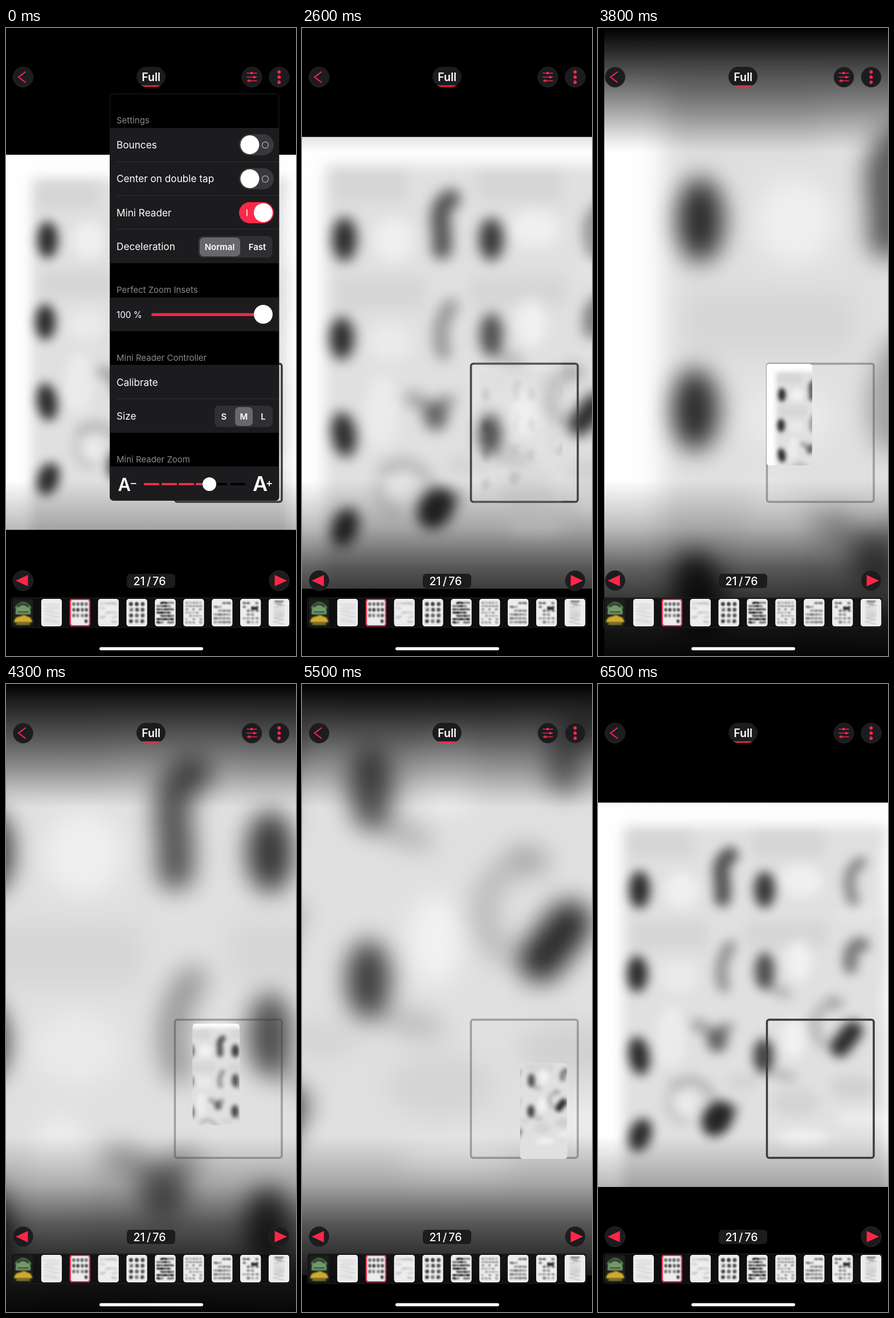
These frames come from a looping animation (509 px wide and 1100 px high, 6600 ms). An HTML page:

```html
<!DOCTYPE html>
<html lang="en">
<head>
<meta charset="utf-8">
<title>Mini Reader</title>
<style>
  html, body { margin: 0; width: 100%; height: 100%; overflow: hidden; background: #000; }
  svg { display: block; width: 509px; height: 1100px; }
  text { font-family: Inter, "Open Sans", sans-serif; fill: #fff; }
  .label { font-size: 17.2px; }
  .head { font-size: 15px; fill: #8a8a8f; }
  .seg { font-size: 15px; font-weight: 600; text-anchor: middle; }
  .red { fill: #fc2848; }
  .line { fill: none; stroke: #fc2848; }
</style>
</head>
<body>
<svg id="stage" viewBox="0 0 509 1100">
  <defs>
    <filter id="soft" filterUnits="userSpaceOnUse" x="-40" y="-40" width="590" height="740" color-interpolation-filters="sRGB">
      <feGaussianBlur stdDeviation="9.5"/>
    </filter>
    <filter id="fine" color-interpolation-filters="sRGB"><feGaussianBlur stdDeviation="1"/></filter>
    <linearGradient id="topShade" x2="0" y2="1">
      <stop offset="0" stop-opacity="1"/><stop offset=".18" stop-opacity=".84"/>
      <stop offset=".46" stop-opacity=".57"/><stop offset=".7" stop-opacity=".32"/>
      <stop offset=".9" stop-opacity=".09"/><stop offset="1" stop-opacity="0"/>
    </linearGradient>
    <linearGradient id="lowShade" x2="0" y2="1">
      <stop offset="0" stop-opacity="0"/><stop offset=".27" stop-opacity=".26"/>
      <stop offset=".5" stop-opacity=".62"/><stop offset=".8" stop-opacity=".9"/>
      <stop offset="1" stop-opacity=".97"/>
    </linearGradient>
    <clipPath id="pageClip"><rect width="509" height="657"/></clipPath>
    <clipPath id="frameClip"><rect x="295" y="586.5" width="190" height="245"/></clipPath>
    <clipPath id="viewClip"><rect id="view" rx="5"/></clipPath>
    <clipPath id="pillClip"><rect x="229" y="68" width="51" height="35" rx="17.5"/></clipPath>
    <clipPath id="thumbClip"><rect width="36" height="48" rx="4"/></clipPath>
    <g id="page" clip-path="url(#pageClip)"></g>
  </defs>
  <rect width="509" height="1100"/>
  <use id="main" href="#page"/>
  <rect width="509" height="217" fill="url(#topShade)"/>
  <rect y="792" width="509" height="308" fill="url(#lowShade)"/>
  <rect id="frame" x="296.5" y="588" width="187.5" height="242" rx="4" fill="none" stroke="#3a3a3c" stroke-width="3.5"/>
  <g id="mini" clip-path="url(#frameClip)"><g clip-path="url(#viewClip)">
    <use href="#page" transform="translate(295.5 587) scale(.373)"/>
  </g></g>
  <g id="bars"></g>
  <g id="menu"></g>
</svg>
<script>
const $ = id => document.getElementById(id);
const rect = (x, y, w, h, r, fill, more = '') =>
  `<rect x="${x}" y="${y}" width="${w}" height="${h}" rx="${r}" fill="${fill}" ${more}/>`;
const circle = (x, y, r, fill, more = '') => `<circle cx="${x}" cy="${y}" r="${r}" fill="${fill}" ${more}/>`;
const blob = (x, y, rx, ry, turn, a, fill = '#1c1c1e') =>
  `<ellipse rx="${rx}" ry="${ry}" fill="${fill}" opacity="${a}" transform="translate(${x} ${y}) rotate(${turn})"/>`;
const stroke = (d, w, a) =>
  `<path d="${d}" fill="none" stroke="#1c1c1e" stroke-width="${w}" stroke-linecap="round" opacity="${a}"/>`;
const text = (cls, x, y, s, more = '') => `<text class="${cls}" x="${x}" y="${y}" ${more}>${s}</text>`;
const RED = '#fc2848', PANEL = '#1c1c1f';

function drawPage() {
  const light = (x, y, rx, ry, a) => blob(x, y, rx, ry, 0, a, '#fff');
  const marks = [
    rect(44, 262, 452, 650, 12, '#e0e0e0'),
    rect(52, 266, 112, 50, 8, '#d6d6d6'), rect(265, 266, 125, 50, 8, '#d6d6d6'),
    rect(60, 425, 130, 48, 8, '#d6d6d6'), rect(255, 425, 140, 44, 8, '#d6d6d6'),
    light(145, 372, 30, 32, .5), light(350, 356, 38, 28, .5), light(345, 492, 22, 36, .55),
    light(140, 520, 34, 28, .3), light(128, 625, 22, 55, .5), light(336, 625, 20, 34, .6),
    light(152, 738, 16, 18, .4), light(352, 795, 44, 14, .55), light(455, 762, 48, 14, .4),
    light(505, 350, 22, 80, .5), light(500, 560, 14, 60, .3), light(450, 410, 40, 14, .2),
    blob(73, 371, 18, 32, 0, .92), blob(69, 515, 18, 31, 0, .92),
    blob(72, 655, 18, 33, -9, .92), blob(74, 790, 19, 29, 18, .92),
    stroke('M228 312Q210 322 213 345T215 386', 28, .72),
    stroke('M228 468Q205 498 217 536', 22, .38),
    blob(206, 628, 18, 21, 0, .62), blob(180, 606, 22, 12, 25, .3), blob(222, 606, 14, 10, 0, .35),
    blob(206, 762, 25, 32, 30, .95), blob(231, 748, 12, 12, 0, .4),
    stroke('M122 725Q122 762 150 768', 14, .13), stroke('M130 708Q170 680 196 722', 18, .2),
    blob(287, 371, 18, 31, 0, .86), blob(287, 510, 17, 32, 0, .74), blob(312, 544, 24, 9, 20, .25),
    blob(285, 655, 17, 30, 0, .82), blob(318, 688, 26, 9, 12, .2),
    stroke('M452 324Q420 342 439 390', 20, .45),
    stroke('M454 465Q430 464 434 502', 25, .52),
    stroke('M414 566Q392 562 378 584T386 634', 19, .2), blob(405, 562, 14, 10, 20, .16),
    stroke('M438 612L416 640', 34, .92),
    blob(438, 708, 40, 20, 0, .08), blob(340, 735, 42, 24, 0, .06),
    blob(250, 700, 30, 14, 0, .06), blob(130, 640, 8, 60, 0, .03)
  ];
  return '<rect width="509" height="657" fill="#fefefe"/>' +
    `<g filter="url(#soft)"><g transform="translate(0 -222)">${marks.join('')}</g></g>`;
}

function drawThumbs() {
  let seed = 7;
  const rnd = () => (seed = seed * 16807 % 2147483647) / 2147483647;
  // columns, rows, chance of a mark, darkest opacity, mark size
  const looks = [0, [1, 12, .9, .12, 15], [4, 4, .85, .9, 2.8], [3, 5, .8, .16, 6], [3, 4, 1, .9, 3.4],
    [5, 7, .85, 1, 3.7], [5, 7, .8, .4, 2.8], [4, 6, .8, .55, 4], [4, 6, .7, .55, 3.2], [1, 11, 1, .2, 11]];
  return looks.map((look, i) => {
    let art = '';
    if (!look) {
      art = rect(0, 0, 36, 48, 4, '#182018') +
        '<path d="M4 14Q18-3 32 14L30 20H6Z" fill="#6f9968"/><path d="M8 14Q18 4 28 14" stroke="#1c241c" stroke-width="3" fill="none"/>' +
        rect(5, 20, 26, 7, 1, '#7fa579') + rect(8, 22, 20, 2, 0, '#243024') +
        '<path d="M2 41Q4 30 12 31Q20 26 26 31Q33 31 34 41Z" fill="#d0a92c"/>' + rect(6, 42, 24, 3.5, 0, '#8b7c32');
    } else {
      const [cols, rows, chance, dark, size] = look;
      art = rect(0, 0, 36, 48, 4, '#ededed');
      for (let r = 0; r < rows; r++) for (let c = 0; c < cols; c++) {
        const x = 18 + (c - (cols - 1) / 2) * 30 / cols, y = 4 + (r + .5) * 40 / rows;
        const a = dark * (.45 + .55 * rnd());
        if (rnd() < chance) art += blob(x + rnd() - .5, y, size, Math.min(14 / rows, size * 1.2), rnd() * 20 - 10, a);
      }
      if (i === 8) art += rect(19, 14, 12, 5, 1, '#333');
      if (i === 9) art += rect(10, 3, 16, 3, 1, '#777') + rect(13, 8, 10, 2, 1, '#888');
    }
    const edge = i === 2 ? rect(1, 1, 34, 46, 4, 'none', `stroke="${RED}" stroke-width="2.2"`)
      : i ? rect(.7, .7, 34.6, 46.6, 4, 'none', 'stroke="#fff" stroke-width="1.4"') : '';
    return `<g transform="translate(${12 + i * 49.9} 1000)"><g clip-path="url(#thumbClip)"><g filter="url(#fine)">${art}</g></g>${edge}</g>`;
  }).join('');
}

function drawBars() {
  const button = (x, y) => circle(x, y, 17.5, PANEL, 'stroke="#2b2b2e"');
  const knob = (x, y) => `<path class="line" d="M422.5 ${y}H440.5" stroke-width="1.4"/>` + circle(x, y, 2.3, RED);
  return button(30, 86) + '<path class="line" d="M34.5 76.5L22 86L34.5 95.5" stroke-width="2"/>' +
    rect(229, 68, 51, 35, 17.5, PANEL) +
    `<g clip-path="url(#pillClip)">${rect(238, 100.5, 33, 3, 0, RED)}</g>` +
    text('', 254.7, 93, 'Full', 'font-size="19.5" font-weight="600" text-anchor="middle"') +
    button(431.5, 86) + knob(431, 79) + knob(436, 86) + knob(427, 92.5) +
    button(479.5, 86) + [77, 86, 95].map(y => circle(479.3, y, 2.9, RED)).join('') +
    button(30, 968) + '<path class="red" d="M17 968L38.5 958V978Z"/>' +
    button(479.5, 968) + '<path class="red" d="M493 968L471.500 958V978Z"/>' +
    rect(212, 956, 85, 25, 6, PANEL) +
    text('', 252, 976, '21 / 76', 'font-size="19.5" font-weight="500" text-anchor="middle" word-spacing="-2"') +
    rect(9.5, 998, 489.5, 52, 4, '#111113', 'fill-opacity=".88" stroke="#252528"') + drawThumbs() +
    rect(164, 1084.5, 182, 5.5, 2.75, '#fff');
}

function drawMenu() {
  const section = (y, h) => rect(183, y, 296, h, 0, PANEL);
  const rule = y => `<path d="M194 ${y}H479" stroke="#303034"/>`;
  const toggle = (y, on) => rect(409, y - 18.5, 61, 37, 18.5, on ? RED : '#39393d') +
    circle(on ? 451.5 : 428, y, 16.5, '#fff') +
    (on ? rect(422, y - 6, 1.6, 12, 0, '#fff') : circle(455, y + .5, 5.5, 'none', 'stroke="#a0a0a4" stroke-width="1.4"'));
  const dash = (x, end, fill) => rect(x, 797, end - x, 4, 1, fill);
  return rect(182.5, 115.5, 296.5, 712, 6, '#000', 'stroke="#1e1e20"') +
    section(175, 237) + section(472, 59) + section(590, 119) +
    '<path d="M183 768H479V821Q479 827 473 827H189Q183 827 183 821Z" fill="#1c1c1f"/>' +
    [234.5, 293.5, 352.5, 649.5].map(rule).join('') +
    [[167, 'Settings'], [464, 'Perfect Zoom Insets'], [583, 'Mini Reader Controller'], [761, 'Mini Reader Zoom']]
      .map(([y, s]) => text('head', 194, y, s)).join('') +
    [[211, 'Bounces'], [270, 'Center on double tap'], [329.5, 'Mini Reader'], [389, 'Deceleration'],
      [626.5, 'Calibrate'], [686, 'Size']].map(([y, s]) => text('label', 194, y, s)).join('') +
    toggle(204.5) + toggle(264) + toggle(323.5, true) +
    rect(337.5, 364.5, 130, 37.5, 8, '#303034') + rect(340, 367, 71, 33, 7, '#67676c') +
    text('seg', 375, 389, 'Normal') + text('seg', 441, 389, 'Fast') +
    rect(366, 661.5, 102, 37.5, 8, '#303034') + rect(402, 664, 31, 33, 7, '#67676c') +
    text('seg', 382.5, 686, 'S') + text('seg', 417.5, 686, 'M') + text('seg', 451.5, 686, 'L') +
    text('', 194, 507.5, '100 %', 'font-size="15.3"') +
    rect(255, 499.5, 190, 5, 2.5, RED) + circle(451.5, 501.5, 16.5, '#fff') +
    text('', 196.5, 811, 'A', 'font-size="31" font-weight="600"') + rect(219, 797, 9.5, 1.8, 0, '#fff') +
    text('', 433, 811, 'A', 'font-size="36" font-weight="600"') +
    '<path d="M457.500 798H466.500M462 793.500V802.500" stroke="#fff" stroke-width="1.8"/>' +
    [242, 273, 303, 333].map(x => dash(x, x + 27, RED)).join('') +
    dash(368, 388, '#000') + dash(393, 420, '#000') + circle(357, 799, 12, '#fff');
}

const LOOP = 6600, STEP = 100, MENU_END = 1400, ZOOM = 2.31;
// time, x, y of the zoomed page
const path = [[2500, -60, 20], [3200, -520, 31], [3800, 11, -8], [4700, -429, -122],
  [5500, -542, -482], [6000, -100, -525], [6600, -100, -530]];
const mix = (a, b, p) => a + (b - a) * p;
const smooth = (t, from, to) => {
  const p = Math.min(1, Math.max(0, (t - from) / (to - from)));
  return p * p * (3 - 2 * p);
};

function along(t, k) {
  const last = path.length - 1;
  let i = 0;
  while (i < last - 1 && t >= path[i + 1][0]) i++;
  const slope = j => {
    if (j === 0 || j === last) return 0;
    const a = path[j - 1], b = path[j + 1];
    return (b[k] - a[k]) / (b[0] - a[0]);
  };
  const a = path[i], b = path[i + 1], h = b[0] - a[0];
  const p = Math.min(1, Math.max(0, (t - a[0]) / h)), q = 1 - p;
  return a[k] * q * q * (1 + 2 * p) + b[k] * p * p * (1 + 2 * q) +
    h * p * q * (slope(i) * q - slope(i + 1) * p);
}

function setBox(el, x, y, w, h) {
  Object.entries({ x, y, width: w, height: h }).forEach(([k, v]) => el.setAttribute(k, v));
}

function render(t) {
  const zoom = smooth(t, 2500, 2900) * (1 - smooth(t, 6000, 6545));
  const scale = mix(1, ZOOM, zoom);
  const x = mix(0, along(t, 1), zoom), y = mix(222, along(t, 2), zoom);
  $('main').setAttribute('transform', `translate(${x} ${y}) scale(${scale})`);

  const ratio = .373 / scale;
  const left = Math.max(295.5, 295.5 - x * ratio), top = Math.max(587, 587 - y * ratio);
  const right = Math.min(485, 295.5 + (509 - x) * ratio);
  const low = Math.min(832, 587 + (1100 - y) * ratio);
  setBox($('view'), left, top, right - left, low - top);
  const shown = Math.min(1, Math.max(0, zoom * 1.3 - .1));
  $('mini').setAttribute('opacity', shown);
  $('mini').setAttribute('display', shown ? 'inline' : 'none');
  $('frame').setAttribute('opacity', mix(1, .4, shown));
  $('menu').setAttribute('display', t < MENU_END ? 'inline' : 'none');
}

$('page').innerHTML = drawPage();
$('bars').innerHTML = drawBars();
$('menu').innerHTML = drawMenu();

const start = performance.now();
let drawn = -1;
function tick() {
  const t = Math.floor((performance.now() - start) % LOOP / STEP) * STEP;
  if (t !== drawn) render(drawn = t);
  requestAnimationFrame(tick);
}
tick();
</script>
</body>
</html>
```
